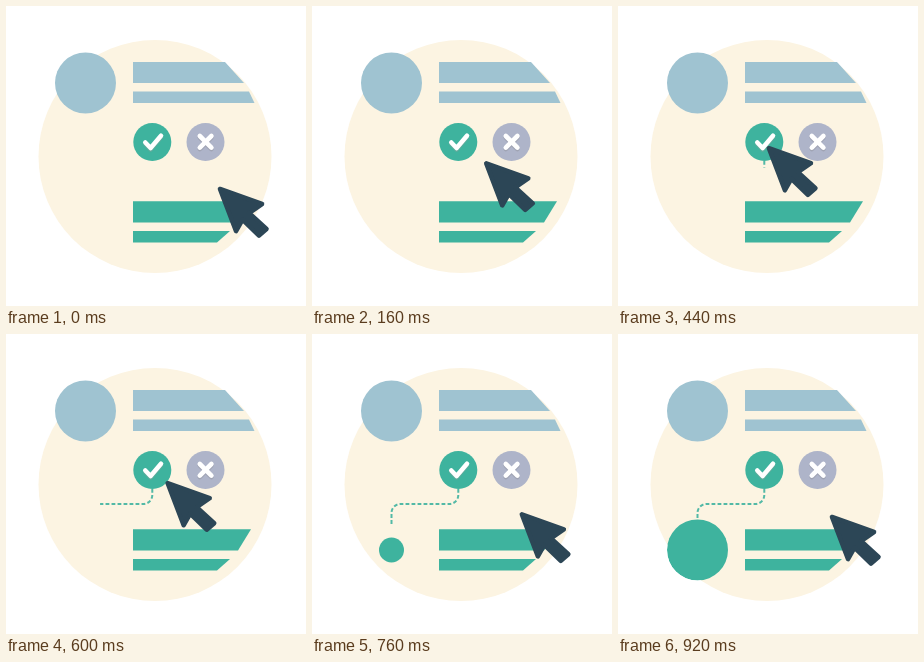
These frames come from a looping animation (300 px wide and 300 px high, 2000 ms). An HTML page with a canvas:

```html
<!DOCTYPE html>
<html lang="en">
<head>
<meta charset="utf-8">
<title>Approve and connect</title>
<style>
  html, body { margin: 0; width: 100%; height: 100%; overflow: hidden; background: #fff; }
  canvas { display: block; width: 300px; height: 300px; }
</style>
</head>
<body>
<canvas id="stage" width="300" height="300"></canvas>
<script>
const ctx = document.getElementById('stage').getContext('2d');
const LOOP = 2000, STEP = 40;
const CREAM = '#fcf4e2', BLUE = '#9fc3d1', TEAL = '#3eb39e', GREY = '#aeb4c9', NAVY = '#2c4656';
const disc = { x: 149, y: 150.5, r: 116.5 };
const node = { x: 79.5, y: 216, r: 30.5 };

const clamp = v => Math.max(0, Math.min(1, v));
const span = (t, from, to) => clamp((t - from) / (to - from));
const mix = (a, b, k) => a + (b - a) * k;
const sine = k => (1 - Math.cos(Math.PI * k)) / 2;

// Bezier easing with flat ends; x1 and x2 are the handle times
function flatEase(k, x1, x2) {
  let lo = 0, hi = 1;
  for (let i = 0; i < 24; i++) {
    const s = (lo + hi) / 2, q = 1 - s;
    if (3 * q * q * s * x1 + 3 * q * s * s * x2 + s * s * s < k) lo = s;
    else hi = s;
  }
  return lo * lo * (3 - 2 * lo);
}

function circle(x, y, r, color) {
  ctx.fillStyle = color;
  ctx.beginPath();
  ctx.arc(x, y, r, 0, Math.PI * 2);
  ctx.fill();
}

function trace(points) {
  ctx.beginPath();
  points.forEach(([x, y]) => ctx.lineTo(x, y));
}

// Bar with a slanted right end
function bar(top, bottom, endTop, endBottom, color) {
  trace([[127, top], [endTop, top], [endBottom, bottom], [127, bottom]]);
  ctx.fillStyle = color;
  ctx.fill();
}

function glyph(lines, shade) {
  ctx.lineWidth = 4.6;
  ctx.lineCap = ctx.lineJoin = 'round';
  for (const [color, dy] of [[shade, 1.5], ['#fff', 0]]) {
    ctx.strokeStyle = color;
    for (const line of lines) {
      trace(line.map(([x, y]) => [x, y + dy]));
      ctx.stroke();
    }
  }
}

function connector(t) {
  const shown = 96 * (1 - Math.pow(1 - span(t, 424, 760), 1.45));
  if (shown <= 0) return;
  const dashes = [];
  for (let at = 0; at < shown; at += 6) dashes.push(Math.min(3.8, shown - at), 2.2);
  dashes.push(0, 200);
  ctx.save();
  ctx.setLineDash(dashes);
  ctx.lineCap = 'butt';
  ctx.lineWidth = 2;
  ctx.strokeStyle = '#52b9a6';
  ctx.beginPath();
  ctx.moveTo(146.3, 155);
  ctx.arcTo(146.3, 170, 137, 170, 9);
  ctx.arcTo(79.5, 170, 79.5, 179, 9);
  ctx.lineTo(79.5, 192);
  ctx.stroke();
  ctx.restore();
}

function newNode(t) {
  const size = t < 840 ? 1.15 * sine(span(t, 705, 840)) : mix(1.15, 1, sine(span(t, 840, 920)));
  if (size <= 0) return;
  ctx.save();
  ctx.beginPath();
  for (const c of [disc, node]) {
    ctx.moveTo(c.x + c.r, c.y);
    ctx.arc(c.x, c.y, c.r, 0, Math.PI * 2);
  }
  ctx.clip();
  circle(node.x, node.y, node.r * size, TEAL);
  ctx.restore();
}

function cursor(t) {
  const k = t < 280 ? sine(span(t, 0, 280)) : 1 - flatEase(span(t, 280, 900), 1, 0.33);
  ctx.save();
  ctx.translate(mix(211.5, 146.5, k), mix(180.5, 138.5, k));
  trace([[2.5, 2.5], [44.5, 17.5], [31.5, 26.5], [49, 42.5], [41.5, 49], [25, 33], [18.5, 44.5]]);
  ctx.closePath();
  ctx.lineJoin = 'round';
  ctx.lineWidth = 4.6;
  ctx.fillStyle = ctx.strokeStyle = NAVY;
  ctx.fill();
  ctx.stroke();
  ctx.restore();
}

function draw(t) {
  ctx.fillStyle = '#fff';
  ctx.fillRect(0, 0, 300, 300);
  circle(disc.x, disc.y, disc.r, CREAM);
  circle(79.5, 77, 30.5, BLUE);
  bar(56, 77, 219, 238, BLUE);
  bar(85.5, 97, 243, 248.5, BLUE);
  bar(195.3, 216.5, 245, 232, TEAL);
  bar(225, 236.5, 224, 211, TEAL);
  connector(t);
  newNode(t);
  circle(146.3, 136, 19, TEAL);
  glyph([[[139.3, 136.5], [144.6, 142], [155, 129.8]]], '#5dab9b');
  circle(199.5, 136, 19, GREY);
  glyph([[[193.8, 130], [205.4, 141.6]], [[205.4, 130], [193.8, 141.6]]], '#a0a4b4');
  cursor(t);
}

const start = performance.now();
function tick() {
  const t = (performance.now() - start) % LOOP;
  draw(Math.floor(t / STEP) * STEP);
  requestAnimationFrame(tick);
}
tick();
</script>
</body>
</html>
```
